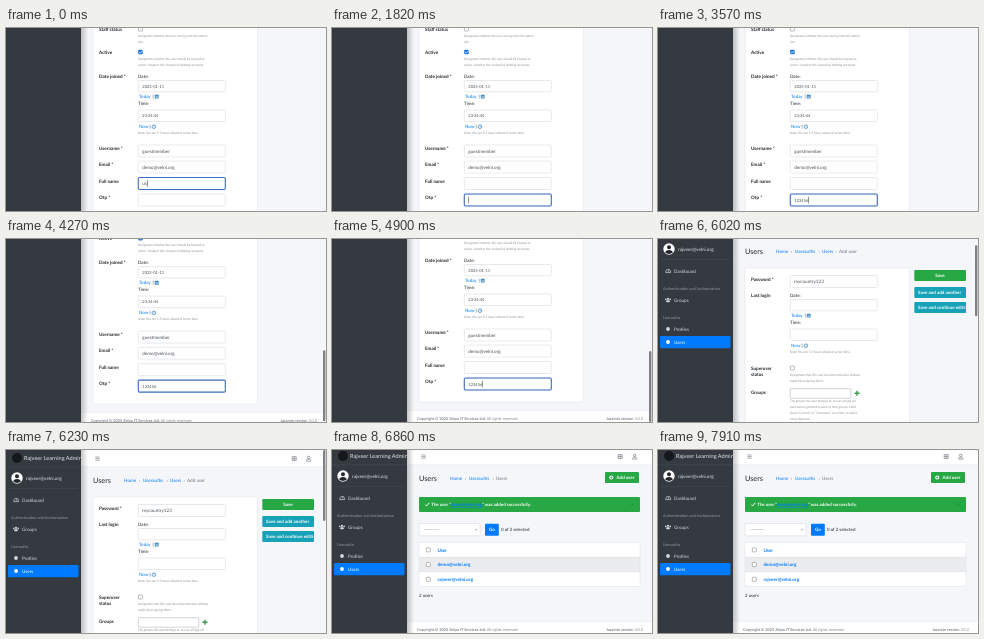
Write an HTML page that moves like this. It is 320 px wide and 183 px high and loops after 8 s.

```html
<!DOCTYPE html>
<html lang="en">
<head>
<meta charset="utf-8">
<title>Add user</title>
<style>
  html, body { margin: 0; width: 100%; height: 100%; overflow: hidden; background: #f4f6f9; }
  svg { display: block; width: 100vw; height: 100vh; }
  text { font-family: Lato, "Open Sans", sans-serif; text-rendering: geometricPrecision; white-space: pre; }
</style>
</head>
<body>
<svg id="stage" viewBox="0 0 320 183"></svg>
<script>
const LOOP = 8000, TICK = 70, BOTTOM = 291;
const INK = '#212529', GREY = '#6c757d', BLUE = '#007bff', GREEN = '#28a745', TEAL = '#17a2b8', LINE = '#ced4da';
const BOLD = 'font-weight="700"', MID = 'text-anchor="middle"';

const text = (x, y, s, size = 4.6, fill = INK, attrs = '') =>
  `<text x="${x}" y="${y + size * 0.35}" font-size="${size}" fill="${fill}" ${attrs}>${s}</text>`;
const box = (x, y, w, h, fill = '#fff', stroke = 'none', r = 1, attrs = '') =>
  `<rect x="${x}" y="${y}" width="${w}" height="${h}" rx="${r}" fill="${fill}" stroke="${stroke}" stroke-width=".5" ${attrs}/>`;
const path = (d, stroke, width = 0.6, fill = 'none') =>
  `<path d="${d}" stroke="${stroke}" stroke-width="${width}" fill="${fill}"/>`;
const dot = (x, y, r, fill, stroke = 'none') =>
  `<circle cx="${x}" cy="${y}" r="${r}" fill="${fill}" stroke="${stroke}" stroke-width=".7"/>`;

const label = (y, s) => text(93, y, s, 4.6, INK, BOLD);
const input = (y, value = '', h = 12) => {
  const size = /^\d/.test(value) ? 4.05 : 4.6;
  return box(132.3, y, 87, h, '#fff', LINE) + text(136.3, y + h / 2 + 0.2, value, size, '#495057');
};
const field = (y, name, value) => label(y, name) + input(y - 3.5, value);
const help = (y, ...lines) =>
  lines.map((s, i) => text(132, y + i * 5.8, s, 3.25, '#8b9197', 'font-style="italic"')).join('');
const check = (x, y, on) =>
  box(x, y - 2, 4, 4, on ? '#1a73e8' : '#fff', on ? '#1a73e8' : '#767676', 0.6) +
  (on ? path(`M${x + 0.8} ${y}l1 1.1 1.7-2.1`, '#fff', 0.7) : '');
const flag = (y, name, on, ...lines) => label(y, name) + check(132.4, y, on) + help(y + 6.7, ...lines);

const dateTime = (y, name, date, time) =>
  label(y, name) + text(132, y, 'Date:', 4.5) + input(y + 4.5, date, 11.3) +
  text(133, y + 20.5, 'Today', 4.5, BLUE) + text(146.4, y + 20.5, '|', 4.5) +
  box(148.8, y + 18.7, 3.8, 3.8, '#2f7fc0', 'none', 0.4) + path(`M149.4 ${y + 20.3}h2.6m-2.6 1.2h2.6`, '#fff', 0.5) +
  text(132, y + 27.5, 'Time:', 4.5) + input(y + 34, time, 11.5) +
  text(133, y + 50.7, 'Now', 4.5, BLUE) + text(143.4, y + 50.7, '|', 4.5) +
  dot(147.9, y + 50.7, 1.8, '#fff', '#2f7fc0') + path(`M147.9 ${y + 49.6}v1.2h.8`, '#2f7fc0', 0.4) +
  help(y + 57.2, 'Note: You are 5.5 hours ahead of server time.');

const button = (y, s, fill) =>
  box(256.3, y, 51.7, 11, fill) +
  `<svg x="257" y="${y}" width="50.6" height="11" viewBox="257 ${y} 50.6 11">` +
  (s === 'Save' ? text(282, y + 5.5, s, 4.5, '#fff', BOLD + MID.padStart(MID.length + 1))
                : text(260, y + 5.5, s, 4.5, '#fff', BOLD)) + '</svg>';

const crumbs = last =>
  text(87, 28, 'Users', 7.3) +
  text(118, 28, 'Home', 4.6, BLUE) + text(132.7, 28, '›', 4.6, GREY) +
  text(137, 28, 'Userauths', 4.6, BLUE) + text(160.5, 28, '›', 4.6, GREY) +
  text(164, 28, 'Users', 4.6, last ? BLUE : GREY) +
  (last ? text(177.6, 28, '›', 4.6, GREY) + text(181, 28, last, 4.6, GREY) : '');

const header =
  box(75, -30, 245, 44.7, '#fff', 'none', 0) + path('M75 14.8h245', '#dee2e6', 0.4) +
  path('M89.3 5h4.4m-4.4 1.6h4.4m-4.4 1.6h4.4', GREY, 0.6) +
  path('M286.2 4.6h4v4h-4zM288.2 4.6v4M286.2 6.6h4', GREY, 0.6) +
  dot(302.7, 5.4, 1.2, 'none', GREY) + path('M300.6 9.2v-.6q0-1.2 1.2-1.2h1.8q1.2 0 1.2 1.2v.6z', GREY, 0.6);

const footer = y =>
  box(75, y - 8.5, 245, 40, '#fff', 'none', 0) + path(`M75 ${y - 8.5}h245`, '#dee2e6', 0.4) +
  text(85, y, `<tspan ${BOLD}>Copyright © 2025 Zelpo IT Services Ltd.</tspan> All rights reserved.`, 3.9, '#7c858d') +
  text(311, y, `<tspan ${BOLD}>Jazzmin version</tspan> 3.0.2`, 3.9, '#7c858d', 'text-anchor="end"');

const FULL = 417, OTP = 433.5;
const form =
  crumbs('Add user') +
  box(87, 45, 164.5, 409, '#fff', '#dfe3e7', 1.2) +
  button(47, 'Save', GREEN) + button(64, 'Save and add another', TEAL) + button(79, 'Save and continue editing', TEAL) +
  field(56, 'Password *', 'mycountry123') +
  dateTime(72, 'Last login', '', '') +
  flag(145, 'Superuser', false, 'Designates that this user has all permissions without', 'explicitly assigning them.') +
  label(151.2, 'status') +
  label(169, 'Groups') + box(132.3, 165.7, 60.5, 9.5, '#fff', '#a5abb1', 0.6) + path('M196.5 170.3h5m-2.5-2.5v5', '#3c9a4c', 1.4) +
  help(178, 'The groups this user belongs to. A user will get all', 'permissions granted to each of their groups. Hold',
    'down “Control”, or “Command” on a Mac, to select', 'more than one.') +
  label(207, 'User') + label(213.2, 'permissions') + box(132.3, 203, 152.5, 9, '#fff', '#a5abb1', 0.6) +
  help(215.5, 'Specific permissions for this user. Hold down “Control”,', 'or “Command” on a Mac, to select more than one.') +
  field(232.2, 'First name', 'user') + field(248.7, 'Last name', 'profile') +
  flag(265, 'Staff status', false, 'Designates whether the user can log into this admin', 'site.') +
  flag(288, 'Active', true, 'Designates whether this user should be treated as', 'active. Unselect this instead of deleting accounts.') +
  dateTime(312, 'Date joined *', '2025-01-11', '23:34:44') +
  field(384.5, 'Username *', 'guestmember') + field(400.6, 'Email *', 'demo@velni.org') +
  field(FULL, 'Full name') + field(OTP, 'Otp *') +
  `<rect id="focus" x="132.3" width="87" height="12" rx="1.2" fill="none" stroke="#3f6fc4" stroke-width="1.1"/>` +
  text(136.3, 0, '', 4.6, '#495057', 'id="typed"') +
  `<rect id="caret" width=".5" height="6.5" fill="#222"/>` +
  footer(471);

const row = (y, s, fill) =>
  box(87, y, 221, 14.7, fill, '#dee2e6', 0) + check(94.3, y + 7.4) + text(105.5, y + 7.5, s, 4.6, BLUE, BOLD);
const list =
  crumbs() +
  box(273, 22, 34, 11, GREEN) + dot(279.3, 27.5, 2.1, '#fff') + path('M278 27.5h2.6m-1.3-1.3v2.6', GREEN, 0.6) +
  text(284.5, 27.5, 'Add user', 4.5, '#fff', BOLD) +
  box(87, 47, 221, 15, GREEN) + path('M93.2 54.6l1.4 1.4 2.6-3.2', '#fff', 0.9) +
  text(99.3, 54.6, `The user “<tspan fill="${BLUE}" text-decoration="underline">demo@velni.org</tspan>” was added successfully.`, 4.4, '#fff', BOLD) +
  text(300, 54.4, '×', 5, '#1d7a33', MID) +
  box(87, 73.5, 61, 12.3, '#fff', LINE) + text(92, 79.7, '---------', 4.4, '#495057') + path('M143 79l1.2 1.2 1.2-1.2', '#495057', 0.5) +
  box(153, 73.8, 13.8, 12, BLUE) + text(159.9, 79.8, 'Go', 4.5, '#fff', BOLD + ' ' + MID) +
  text(169, 79.6, '0 of 2 selected', 4.4) +
  row(92.5, 'User', '#fff') + row(107.2, 'demo@velni.org', '#ebecee') + row(121.9, 'rajveer@velni.org', '#fff') +
  text(87, 145, '2 users', 4.4) + footer(180);

const item = (y, s) => text(16, y, s, 4.6, '#d5dade');
const section = (y, s) => text(5, y, s, 3.9, '#9299a0');
const menu =
  dot(11, 6, 5, '#15181b') + text(18, 6, 'Rajveer Learning Admin', 5.6, '#e4e7ea') +
  path('M0 14.8h75M3 36.5h69', '#4b545c', 0.4) +
  dot(11, 26, 5.7, '#fff') + dot(11, 24.2, 2, '#20262b') + path('M7.2 29.6q.4-2.7 3.8-2.7t3.8 2.7q-3.8 2.7-7.6 0z', 'none', 0, '#20262b') +
  text(20, 26, 'rajveer@velni.org', 4.7, '#e4e7ea') +
  path('M7.8 49.6a2.5 2.5 0 1 1 4.8 0zM10.2 48.8l1-2', '#d5dade', 0.7) + item(48, 'Dashboard') +
  section(65.5, 'Authentication and Authorization') +
  dot(10, 75.8, 1.1, '#d5dade') + dot(7.8, 76.4, 0.8, '#d5dade') + dot(12.2, 76.4, 0.8, '#d5dade') +
  box(8.1, 77.3, 3.8, 1.9, '#d5dade') + item(77, 'Groups') +
  section(95, 'Userauths') + dot(10, 106, 1.9, '#d5dade') + item(106, 'Profiles') +
  box(2, 113, 70.5, 12.2, BLUE, 'none', 1.2) + dot(10, 119, 1.9, '#fff') + text(16, 119, 'Users', 4.6, '#fff');

const $ = id => document.getElementById(id);
$('stage').innerHTML =
  `<defs><linearGradient id="shade"><stop stop-opacity=".22"/><stop offset="1" stop-opacity="0"/></linearGradient>
   <clipPath id="side"><rect width="75" height="183"/></clipPath></defs>
   <rect width="320" height="183" fill="#f4f6f9"/>
   <g id="page">${header}<g id="form">${form}</g><g id="list">${list}</g></g>
   <rect x="75" width="7" height="183" fill="url(#shade)"/>
   <g clip-path="url(#side)"><rect width="75" height="183" fill="#343a40"/><g id="menu">${menu}</g></g>
   <rect id="bar" x="317" width="2.4" height="71" rx="1.2" fill="#808080"/>`;

const clamp = v => Math.max(0, Math.min(1, v));
const keys = [2240, 2380, 2520, 2870, 3220, 3570];
// Upward flick, one value per tick, ending in a small overshoot.
const flick = [276, 240, 190, 142, 100, 64, 36, 16, 4, -1, -2, -2, -1.6, -1.2, -0.8, -0.5, -0.2, 0];

function scrollAt(t) {
  if (t >= 6860) return 0;
  if (t >= 5530) return flick[Math.min(flick.length - 1, (t - 5530) / TICK)];
  return 264 + (BOTTOM - 264) * (1 - (1 - clamp((t - 3990) / 490)) ** 3);
}

function barAlpha(t) {
  if (t < 4060 || t >= 6860) return 0;
  return t < 5530 ? 1 - clamp((t - 4970) / 280) : 1 - clamp((t - 6440) / 280);
}

function draw(now) {
  const t = Math.floor(now % LOOP / TICK) * TICK;
  const y = scrollAt(t), saved = t >= 6860, inOtp = t >= 1820;

  $('page').setAttribute('transform', `translate(0 ${-y})`);
  $('menu').setAttribute('transform', `translate(0 ${-y})`);
  $('form').style.display = saved ? 'none' : '';
  $('list').style.display = saved ? '' : 'none';
  $('bar').setAttribute('y', clamp(y / BOTTOM) * 112);
  $('bar').setAttribute('opacity', barAlpha(t));

  if (!saved) {
    const pressed = keys.filter(k => k <= t);
    const value = inOtp ? '123456'.slice(0, pressed.length) : 'us'.slice(0, Math.max(0, 2 - t / TICK));
    const top = (inOtp ? OTP : FULL) - 3.5;
    const lastEdit = inOtp ? pressed.at(-1) ?? 1820 : 262;
    const typed = $('typed');
    typed.textContent = value;
    typed.setAttribute('font-size', inOtp ? 4.05 : 4.6);
    typed.setAttribute('y', top + 7.7);
    $('focus').setAttribute('y', top);
    $('caret').setAttribute('x', 136.4 + (value ? typed.getComputedTextLength() : 0));
    $('caret').setAttribute('y', top + 2.8);
    $('caret').style.display = t < 262 || Math.floor((t - lastEdit) / 498) % 2 === 0 ? '' : 'none';
  }
  requestAnimationFrame(() => draw(performance.now() - start));
}
const start = performance.now();
draw(0);
</script>
</body>
</html>
```
